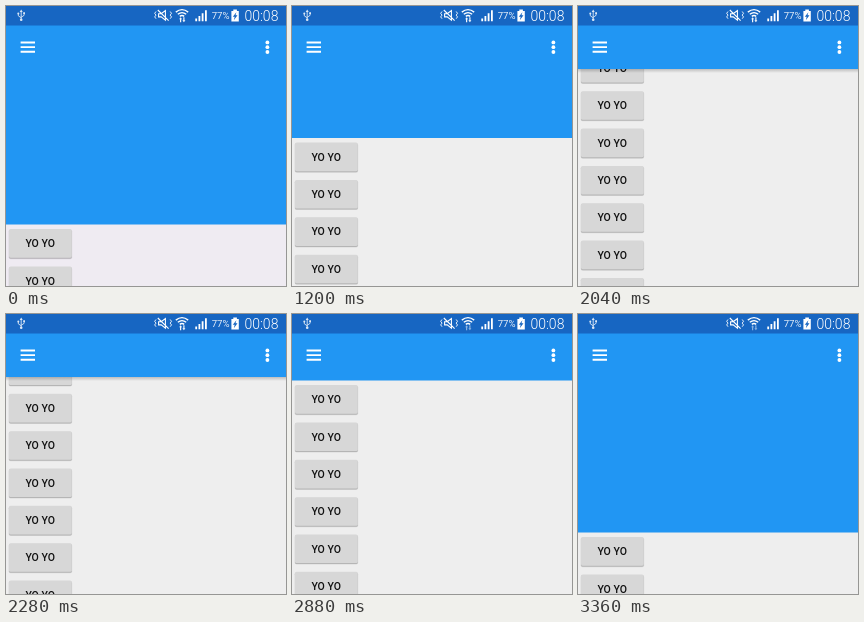
Write an HTML page that moves like this. It is 280x280 px and loops after 3.84 s.

```html
<!DOCTYPE html>
<html lang="en">
<head>
<meta charset="utf-8">
<title>Collapsing toolbar</title>
<style>
  html, body { margin: 0; width: 100%; height: 100%; overflow: hidden; }
  svg { display: block; width: 100vw; height: 100vh; }
  text { font-family: Roboto, "Noto Sans", sans-serif; }
  .label { font-size: 10.5px; font-weight: 500; text-anchor: middle; fill: #111; }
  .line { fill: none; stroke: #fff; }
</style>
</head>
<body>
<svg viewBox="0 0 280 280">
  <defs>
    <linearGradient id="fade" x2="0" y2="1">
      <stop offset="0" stop-color="#000" stop-opacity=".2"/>
      <stop offset="1" stop-color="#000" stop-opacity="0"/>
    </linearGradient>
    <g id="button">
      <rect x="2.6" y="-13.8" width="63.6" height="29.6" rx="2" fill="#000" opacity=".09"/>
      <rect x="3" y="-13.5" width="62.8" height="28.8" rx="1.6" fill="#000" opacity=".17"/>
      <rect x="3" y="-14.3" width="62.8" height="28.6" rx="1.6" fill="#d7d7d7"/>
      <text class="label" x="34.2" y="3.8">YO YO</text>
    </g>
  </defs>

  <rect id="page" width="280" height="280"/>
  <g id="list"></g>

  <rect id="shadow" y="63" width="280" height="4" fill="url(#fade)"/>
  <rect id="header" width="280" fill="#2196f3"/>
  <rect width="280" height="19.5" fill="#1766c2"/>

  <g fill="#fff">
    <path class="line" stroke-width="1.9" d="M14.6 36.5h14.4M14.6 41.1h14.4M14.6 45.7h14.4"/>
    <circle cx="261.4" cy="36.4" r="1.9"/>
    <circle cx="261.4" cy="41.2" r="1.9"/>
    <circle cx="261.4" cy="46" r="1.9"/>
  </g>

  <g fill="#fff">
    <!-- usb -->
    <g opacity=".85">
      <path class="line" stroke-width=".9" d="M15.2 5v8.5M12.3 7.8v2l2.9 2M18.1 7.3v2l-2.9 2"/>
      <path d="M13.7 6l1.5-2.4L16.7 6z"/>
      <circle cx="15.2" cy="13.8" r="1.3"/>
      <circle cx="12.3" cy="7.6" r="1"/>
      <path d="M17.2 6.3h1.8v1.8h-1.8z"/>
    </g>
    <!-- muted speaker -->
    <path class="line" stroke-width=".9" d="M150 5.5l-1.3 1.8 1.3 1.8-1.3 1.8 1.3 1.8M164.2 5.5l1.3 1.8-1.3 1.8 1.3 1.8-1.3 1.8"/>
    <path class="line" stroke-width="1.1" d="M152.6 7.7h2.6l4.2-3.2v9.6l-4.2-3.2h-2.6zM151.8 4l10.8 10.6"/>
    <!-- wifi -->
    <path class="line" stroke-width="1.4" d="M169.8 6.1q6.2-5 12.4 0M171.8 8.3q4.2-3.4 8.4 0M173.8 10.4q2.2-1.8 4.4 0"/>
    <path id="arrows" d="M173.1 13.2l1.5-2 1.5 2h-.9v3h-1.2v-3zM176.4 14.2h.9v-3h1.2v3h.9l-1.5 2z"/>
    <!-- signal -->
    <path d="M189.3 12.6h1.8v2.6h-1.8zM192.5 10h1.8v5.2h-1.8zM195.7 7.2h1.8v8h-1.8zM199 4.2h1.8v11H199z"/>
    <text x="205.7" y="13.4" font-size="9.6" opacity=".9">77%</text>
    <!-- battery -->
    <path d="M227.3 3.5h3.6v1.4h1.9v10.7h-7.4V4.9h1.9z"/>
    <path d="M230.4 6.2l-3.6 4.5h1.9l-.9 3.5 3.7-4.9h-2z" fill="#1766c2"/>
    <text x="238.4" y="14.8" font-size="14" font-weight="300" textLength="">00:08</text>
  </g>
</svg>

<script>
  const STEP = 120, LOOP = 3840;
  const FIRST = 7;       // step in which the scroll begins
  const TOP = 218.5, COLLAPSED = 63, PITCH = 37.35, COUNT = 9;

  // scroll distance for each step of the drag up and back down
  const scroll = [
    10, 31, 58, 86.5, 117, 146, 170, 188.4, 199, 207, 212.6,
    216.5, 218, 214, 203, 187.4, 171, 152, 129, 103.1, 50, 0
  ];

  const $ = id => document.getElementById(id);
  const [page, list, header, shadow, arrows] =
    ["page", "list", "header", "shadow", "arrows"].map($);

  for (let i = 0; i < COUNT; i++) {
    const button = document.createElementNS("http://www.w3.org/2000/svg", "use");
    button.setAttribute("href", "#button");
    button.setAttribute("y", 18.9 + i * PITCH);
    list.append(button);
  }

  function draw(time) {
    const step = Math.floor((time % LOOP) / STEP);
    const offset = scroll[step - FIRST] || 0;
    const edge = TOP - offset;
    list.setAttribute("transform", `translate(0 ${edge})`);
    header.setAttribute("height", Math.max(COLLAPSED, edge));
    shadow.setAttribute("opacity", edge <= COLLAPSED ? 1 : 0);
    page.setAttribute("fill", step < FIRST ? "#efebf2" : "#eeeeee");
    arrows.setAttribute("opacity", step < 22 ? 0.95 : 0.5);
  }

  const start = performance.now();
  function tick() {
    draw(performance.now() - start);
    requestAnimationFrame(tick);
  }
  tick();
</script>
</body>
</html>
```
